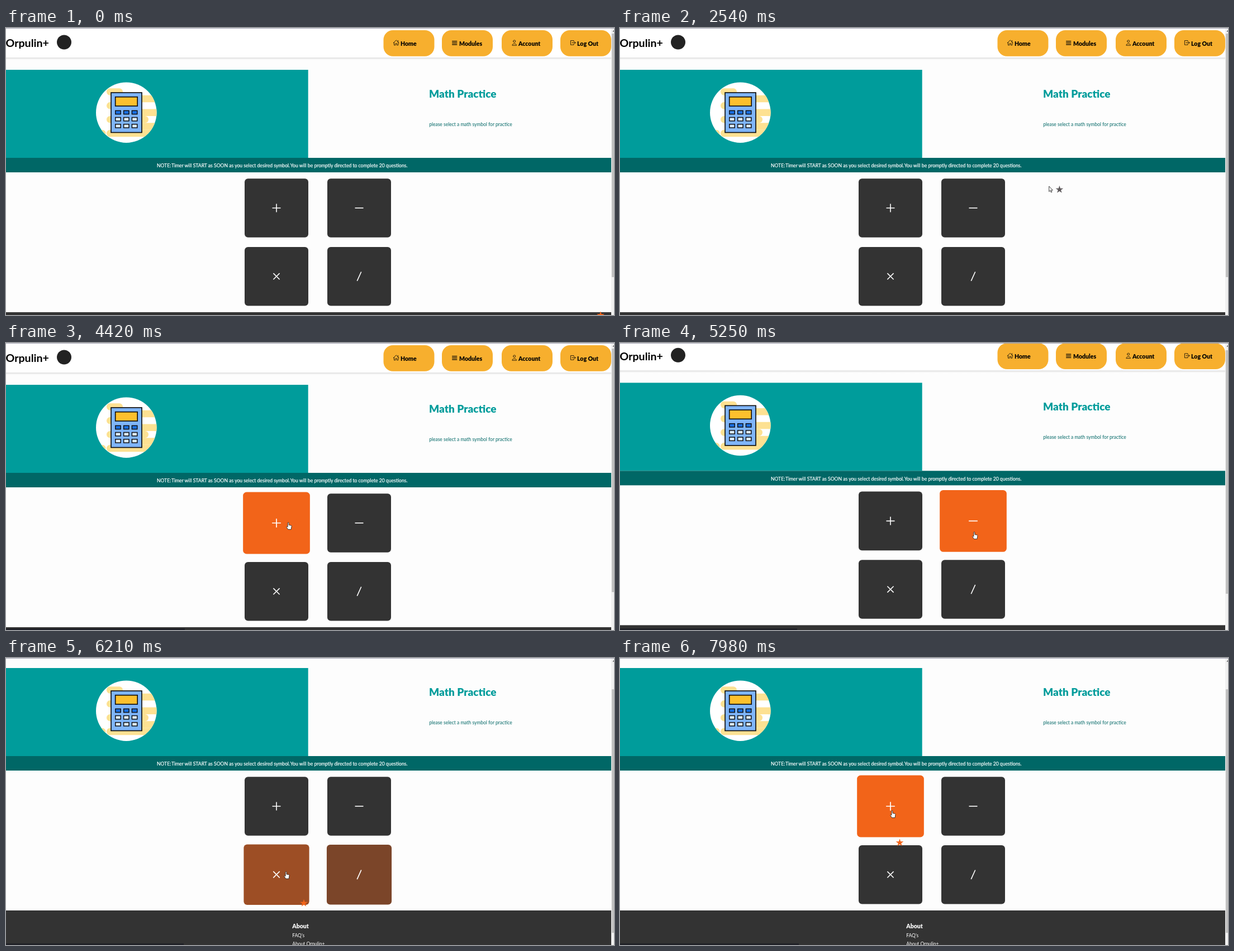
Animation of 1088 by 515 pixels, one loop 8000 ms. Source, as an HTML page:

```html
<!DOCTYPE html>
<html lang="en">
<head>
<meta charset="utf-8">
<title>Math Practice</title>
<style>
  html, body { margin: 0; width: 100%; height: 100%; overflow: hidden; background: #fdfdfd; }
  svg { display: block; width: 100vw; height: 100vh; }
  text { font-family: Lato, "Open Sans", sans-serif; }
  .body { font-size: 8.5px; }
  .note { font-size: 8.6px; }
  .bold { font-size: 10.5px; font-weight: 900; }
  .icon { fill: none; stroke: #1c1608; stroke-width: .9; stroke-linejoin: round; stroke-linecap: round; }
</style>
</head>
<body>
<svg viewBox="0 0 1088 515" preserveAspectRatio="none">
  <defs>
    <linearGradient id="shade" x2="0" y2="1">
      <stop stop-color="#dedede"/><stop offset="1" stop-color="#fdfdfd"/>
    </linearGradient>
    <clipPath id="disc"><circle cx="215.3" cy="151.7" r="54.3"/></clipPath>
  </defs>
  <rect width="1088" height="515" fill="#fdfdfd"/>

  <g id="page">
    <rect width="1083" height="53" fill="#fff"/>
    <rect y="53" width="1083" height="4" fill="url(#shade)"/>
    <text x="-.5" y="34.3" font-size="19.6" font-weight="700">Orpulin+</text>
    <circle cx="104" cy="25.5" r="13" fill="#222"/>
    <g id="nav"></g>

    <rect y="75" width="540.7" height="158" fill="#009c9b"/>
    <g clip-path="url(#disc)">
      <rect x="160" y="96" width="111" height="112" fill="#fff"/>
      <g id="bars" fill="#fde192"></g>
    </g>
    <g id="calc" stroke="#111" stroke-width="1.7">
      <rect x="188" y="116" width="55" height="71.5" fill="#7fb5fa"/>
      <rect x="195.7" y="123.7" width="39.5" height="16.3" fill="#fdc02d"/>
    </g>

    <text x="817.3" y="124.5" font-size="19" font-weight="900" fill="#009c9b" text-anchor="middle">Math Practice</text>
    <text class="body" x="831.5" y="175.7" fill="#006766" text-anchor="middle">please select a math symbol for practice</text>

    <rect y="233" width="1083" height="26" fill="#006766"/>
    <text class="note" x="494.2" y="250.3" fill="#fff" stroke="#fff" stroke-width=".2" text-anchor="middle">NOTE: <tspan dx="-1.3">Timer will START as SOON as you select desired symbol. </tspan><tspan dx="-1.3">You will be promptly directed to complete 20 questions.</tspan></text>

    <g id="cards" stroke="#fff" stroke-width="1.6"></g>

    <rect y="510" width="1083" height="200" fill="#333"/>
    <g fill="#fff">
      <text class="bold" x="512.2" y="542">About</text>
      <text class="body" x="512.2" y="557.8">FAQ's</text>
      <text class="body" x="512.2" y="573.3">About Orpulin+</text>
    </g>
  </g>

  <rect id="status" y="512.3" height="3" fill="#1f2027"/>
  <path id="star"/>
  <rect x="1083" width="5" height="515" fill="#f1f1f1"/>
  <rect id="thumb" x="1084" width="4" height="437" fill="#c1c1c1"/>
  <path d="M1085.3 6.5L1088 4V6.5Z" fill="#505050"/>
  <rect width="1088" height="1" fill="#a5a5b5"/>
  <g stroke-linejoin="round" fill="#fff" stroke="#222" stroke-width=".85">
    <path id="arrow" d="M0 0V9.6L2.2 7.6L3.7 11L5.2 10.3L3.8 7.1H6.7Z"/>
    <path id="hand" d="M-1 .9C-1 -.4 1 -.4 1 .9V4.6L4.8 5.3C5.8 5.6 6 6.2 5.9 7.2L5 12.6H-.4L-3.2 8.4C-3.6 7.3 -2.4 6.8 -1 8.2Z"/>
  </g>
</svg>

<script>
const LOOP = 8000, FADE = 500, LAG = 70, SCROLL = 57;
const DARK = [51, 51, 51], ORANGE = [242, 100, 25], GREY = [95, 91, 93];
const $ = id => document.getElementById(id);
const clamp = v => Math.min(1, Math.max(0, v));
const mix = (a, b, u) => a + (b - a) * u;
const blend = (p, q, u) => `rgb(${p.map((v, i) => Math.round(mix(v, q[i], u)))})`;
const move = (el, x, y) => el.setAttribute('transform', `translate(${x} ${y})`);

function add(parent, tag, attrs = {}) {
  const el = document.createElementNS('http://www.w3.org/2000/svg', tag);
  for (const k in attrs) el.setAttribute(k, attrs[k]);
  return parent.appendChild(el);
}

// Menu buttons: left edge, label, label offset, icon around its own centre
const menu = [
  [675.5, 'Home', 30.5, 'M-5 0L0 -5L5 0M-3.7 -1V4H-1.2V1H1.2V4H3.7V-1M3.3 -4.4V-2'],
  [780, 'Modules', 31, 'M-4 -3H4M-4 0H4M-4 3H4'],
  [887, 'Account', 30, 'M-2 -3A2 2 0 0 1 2 -3A2 2 0 0 1 -2 -3M-3.8 4C-3.8 .3 3.8 .3 3.8 4Z'],
  [992, 'Log Out', 30, 'M1.3 -2.7V-4.2H-4.3V3.4H1.3V1.8M-1.8 -.4H4.4M2.5 -2.3L4.4 -.4L2.5 1.5']
];
menu.forEach(([x, label, gap, d], i) => {
  const g = add($('nav'), 'g');
  move(g, x, 4);
  add(g, 'rect', { width: 91, height: 46.7, rx: 17, fill: '#f7af2e' });
  add(g, 'text', { class: 'bold', x: gap, y: 27.6 }).textContent = label;
  const icon = add(g, 'path', { class: 'icon', d });
  move(icon, 22.7, 22.8);
  if (i === 1) icon.style.strokeWidth = 1.5;
});

// Calculator picture
for (let i = 0; i < 7; i++) {
  const x = i % 2 ? 190 : 180, end = i % 2 ? 275 : 209 + i * 11.5;
  add($('bars'), 'rect', { x, y: 108.3 + i * 12.4, width: end - x, height: 12.5, rx: 6.2 });
}
add($('bars'), 'rect', { x: 160, y: 182.7, width: 18.5, height: 12.5, rx: 6.2 });
for (let i = 0; i < 9; i++)
  add($('calc'), 'rect', {
    x: 195.8 + i % 3 * 14.8, y: 148.3 + Math.floor(i / 3) * 12.2, width: 9.4, height: 6.3,
    fill: i < 3 ? '#1a6fe3' : '#dcecfd', 'stroke-width': 1.5
  });

// Cards: symbol, status bar width, hover spans
const cards = [
  { d: 'M-7.5 0H7.5M0 -7.5V7.5', link: 320, spans: [[3400, 4650], [6950, LOOP + FADE]] },
  { d: 'M-7.5 0H7.5', link: 317, spans: [[4700, 5670]] },
  { d: 'M-5.6 -5.6L5.6 5.6M5.6 -5.6L-5.6 5.6', link: 318, spans: [[6050, 6920]] },
  { d: 'M-3.7 8.2L3.7 -8.2', link: 323, spans: [[5670, 6030]] }
];
cards.forEach((c, i) => {
  c.x = 484 + i % 2 * 148;
  c.y = 323 + (i >> 1) * 122.7;
  c.g = add($('cards'), 'g');
  c.box = add(c.g, 'rect', { x: -57, y: -52.8, width: 114, height: 105.6, rx: 6, stroke: 'none' });
  add(c.g, 'path', { d: c.d, fill: 'none' });
});

$('star').setAttribute('d', 'M' + Array.from({ length: 10 }, (_, i) => {
  const r = i % 2 ? 2.8 : 7.2, a = i * Math.PI / 5;
  return (r * Math.sin(a)).toFixed(2) + ' ' + (-r * Math.cos(a)).toFixed(2);
}).join('L') + 'Z');

// Pointer key points: time, x, y
const path = [
  [0, 1050, 514], [750, 845, 393], [1570, 830, 347], [2540, 768, 284], [3310, 556, 262],
  [3700, 515, 312], [4420, 505, 322], [5250, 634, 339], [5460, 625, 361], [5650, 625, 361],
  [5720, 627, 370], [6340, 468, 387], [6740, 468, 387], [6810, 475, 383],
  [7010, 488, 305], [7380, 486, 272], [7840, 486, 272], [7980, 487, 274]
];

function pointer(t) {
  let i = 1;
  while (i < path.length - 1 && path[i][0] < t) i++;
  const [t0, x0, y0] = path[i - 1], [t1, x1, y1] = path[i], u = clamp((t - t0) / (t1 - t0));
  return [mix(x0, x1, u), mix(y0, y1, u)];
}

// cubic-bezier(.25, .1, .25, 1)
function ease(x) {
  if (x <= 0 || x >= 1) return clamp(x);
  const bez = (a, b, s) => 3 * a * s * (1 - s) ** 2 + 3 * b * s * s * (1 - s) + s ** 3;
  let lo = 0, hi = 1;
  for (let i = 0; i < 24; i++) {
    const m = (lo + hi) / 2;
    if (bez(.25, .25, m) < x) lo = m; else hi = m;
  }
  return bez(.1, 1, lo);
}

function draw(t) {
  const u = clamp((t - 5213) / 247), scroll = SCROLL * u * u * (3 - 2 * u);
  move($('page'), 0, -scroll);
  $('thumb').setAttribute('y', 10 + scroll * .81);

  let over = false, link = 0, last = 0;
  for (const c of cards) {
    let k = 0;
    for (const [a, b] of c.spans) {
      k += ease((t - a) / FADE) - ease((t - b) / FADE);
      if (t >= a && t < b) over = true;
      if (t >= a && a > last) { last = a; link = c.link; }
    }
    c.g.setAttribute('transform', `translate(${c.x} ${c.y}) scale(${1 + .05 * k})`);
    c.box.setAttribute('fill', blend(DARK, ORANGE, k));
  }
  $('status').setAttribute('width', t >= 4210 ? link : 0);

  const [x, y] = pointer(t), [sx, sy] = pointer(t - LAG);
  move($('star'), sx + 14, sy + 1.5 + scroll);
  const grey = clamp((t - 100) / 400) - clamp((t - 3330) / 150);
  $('star').setAttribute('fill', blend(ORANGE, GREY, grey));
  move($('arrow'), x, y);
  move($('hand'), x, y);
  $('arrow').setAttribute('visibility', over ? 'hidden' : 'visible');
  $('hand').setAttribute('visibility', over ? 'visible' : 'hidden');
}

const start = performance.now();
function tick() {
  draw((performance.now() - start) % LOOP);
  requestAnimationFrame(tick);
}
tick();
</script>
</body>
</html>
```
